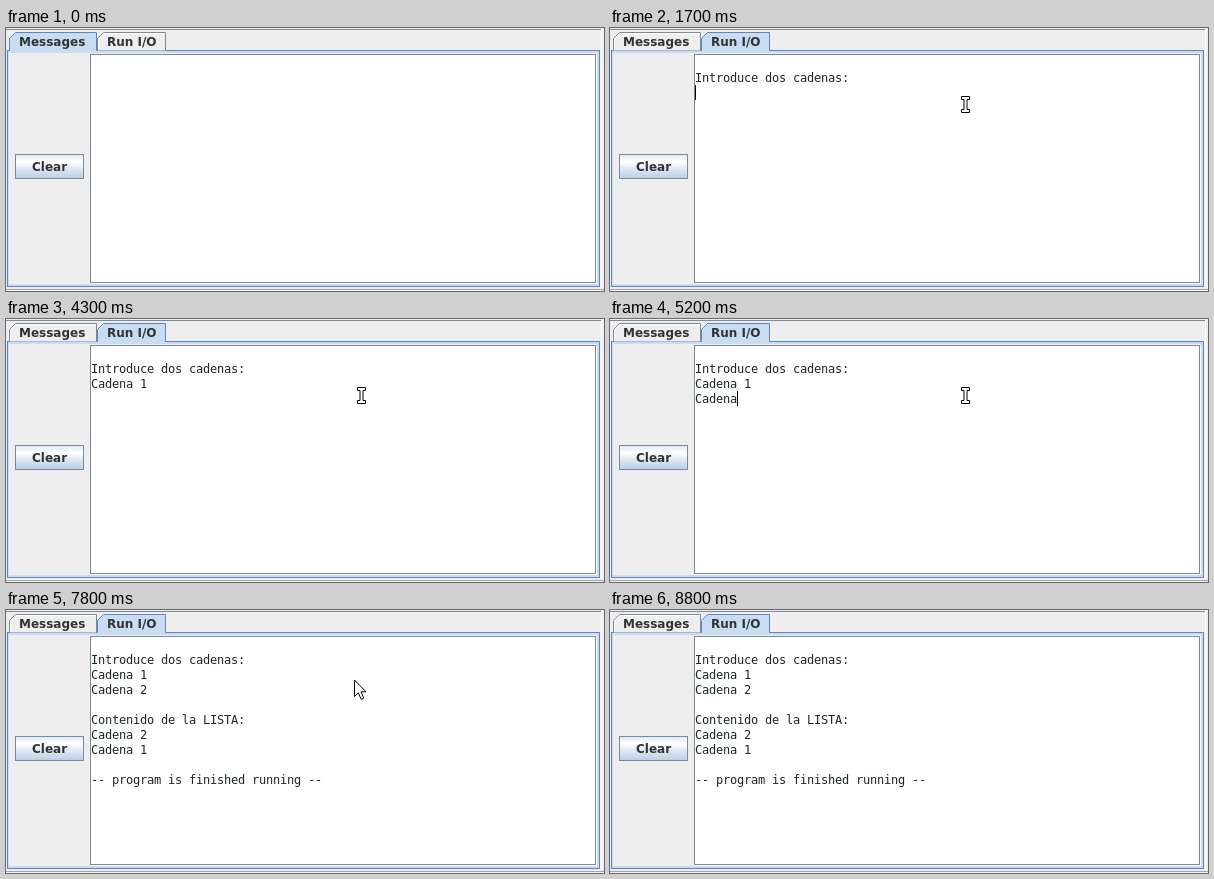
Recreate the animation shown at these times as an HTML page. Size 598 px wide and 263 px high, loop 8.9 s.

```html
<!DOCTYPE html>
<html lang="es">
<head>
<meta charset="utf-8">
<title>Run I/O</title>
<style>
html, body { margin: 0; width: 100%; height: 100%; overflow: hidden; background: #eee; }
svg { display: block; width: 598px; height: 263px; }
.ui { font: bold 12px "DejaVu Sans", sans-serif; fill: #333; }
.out { font: 12px "DejaVu Sans Mono", monospace; fill: #1c2626; white-space: pre; }
.tab { fill: #eee; stroke: #7a8a99; }
.tab.on { fill: #c8ddf2; stroke: #6382bf; }
.join { fill: #c8ddf2; visibility: hidden; }
.shine { fill: none; stroke: #fff; }
.on ~ .join { visibility: visible; }
.on ~ .shine { visibility: hidden; }
.pointer { fill: #fff; stroke: #000; }
</style>
</head>
<body>
<svg viewBox="0 0 598 263" xmlns="http://www.w3.org/2000/svg">
  <defs>
    <linearGradient id="metal" x2="0" y2="1">
      <stop offset="0" stop-color="#dde8f3"/>
      <stop offset=".3" stop-color="#fff"/>
      <stop offset=".6" stop-color="#dde8f3"/>
      <stop offset="1" stop-color="#b8cfe5"/>
    </linearGradient>
  </defs>

  <!-- window frame -->
  <rect width="598" height="263" fill="#eee"/>
  <path d="M0 1.5H595" stroke="#7a8a99"/>
  <path d="M595.5 1V260" stroke="#fff"/>
  <path d="M0 261.5H598" stroke="#a5a5a5"/>
  <path d="M0 262.5H598" stroke="#f4f4f4"/>

  <!-- tab pane -->
  <rect x="1.5" y="22.5" width="592" height="236" fill="#c8ddf2" stroke="#6382bf"/>
  <rect x="3" y="25" width="588" height="231" fill="#eee"/>
  <g>
    <path class="tab" d="M3.5 22.5V10.5L9.5 4.5H90.5V22.5"/>
    <path class="shine" d="M4.5 22V11L10 5.5H90"/>
    <rect class="join" x="4" y="22" width="86" height="1"/>
    <text class="ui" x="13" y="18">Messages</text>
  </g>
  <g>
    <path class="tab" d="M91.5 22.5V10.5L97.5 4.5H159.5V22.5"/>
    <path class="shine" d="M92.5 22V11L98 5.5H159"/>
    <rect class="join" x="92" y="22" width="67" height="1"/>
    <text class="ui" x="101" y="18">Run I/O</text>
  </g>

  <!-- button and text area -->
  <rect x="9.5" y="126.5" width="68" height="24" fill="url(#metal)" stroke="#7a8a99"/>
  <text class="ui" x="26" y="143">Clear</text>
  <path d="M590.5 27V255.5H85" fill="none" stroke="#fff"/>
  <rect x="84.5" y="26.5" width="505" height="228" fill="#fff" stroke="#7a8a99"/>
  <g id="lines"></g>
  <rect id="caret" width="1" height="15" fill="#000"/>

  <path id="beam" class="pointer" d="M.5 .5H8.5V3.5H6V13.5H8.5V16.5H.5V13.5H3V3.5H.5Z"/>
  <path id="arrow" class="pointer" stroke-linejoin="miter"
    d="M.5 1V17.5L4.3 13.8L7.2 20.3L9.8 19.2L7 12.8H12Z"/>
</svg>
<script>
const LOOP = 8900, LEFT = 85, TOP = 27, ROW = 15, COL = 7;
const $ = s => document.querySelector(s);
const ask = '\nIntroduce dos cadenas:\n';
const one = ask + 'Cadena 1\n';
const list = one + 'Cadena 2\n\nContenido de la LISTA:\nCadena 2\nCadena 1\n';
const done = list + '\n-- program is finished running --';

// time, text, caret shown
const typing = [
  [0, '', 0],
  [700, ask, 0],
  [900, ask, 1],
  [1200, ask, 0],
  [1700, ask, 1],
  [2200, ask + 'C', 1],
  [2700, ask + 'Cad', 1],
  [2800, ask + 'Cade', 1],
  [3000, ask + 'Cadena', 1],
  [3200, ask + 'Cadena ', 1],
  [3400, ask + 'Cadena 1', 1],
  [3800, one, 1],
  [4300, one, 0],
  [4700, one + 'Ca', 1],
  [4900, one + 'Cad', 1],
  [5000, one + 'Cade', 1],
  [5100, one + 'Caden', 1],
  [5200, one + 'Cadena', 1],
  [5300, one + 'Cadena ', 1],
  [5500, one + 'Cadena 2', 1],
  [6000, list, 1],
  [6400, done, 0]
];

// time, pointer shape, x, y
const moves = [
  [0, ''],
  [1300, 'beam', 351, 68],
  [6000, 'arrow', 353, 73],
  [7800, 'arrow', 348, 69],
  [7900, 'arrow', 338, 58],
  [8000, 'arrow', 322, 40],
  [8100, 'arrow', 305, 21],
  [8200, 'arrow', 289, 3],
  [8300, '']
];

const at = (steps, t) => steps.findLast(s => s[0] <= t);
const show = (el, on) => el.setAttribute('visibility', on ? 'visible' : 'hidden');

const tabs = document.querySelectorAll('.tab');
const caret = $('#caret');
const rows = Array.from({ length: 11 }, (_, i) => {
  const el = document.createElementNS('http://www.w3.org/2000/svg', 'text');
  el.setAttribute('class', 'out');
  el.setAttribute('x', LEFT);
  el.setAttribute('y', TOP + i * ROW + 12);
  $('#lines').append(el);
  return el;
});

// whole-pixel character advance
rows[0].textContent = 'n'.repeat(40);
$('#lines').style.letterSpacing = (COL - rows[0].getComputedTextLength() / 40).toFixed(4) + 'px';

let last;
function draw(now) {
  const t = now % LOOP;
  const step = at(typing, t);
  if (step !== last) {
    last = step;
    const [time, text, blink] = step;
    const lines = text.split('\n');
    rows.forEach((el, i) => el.textContent = lines[i] || '');
    tabs.forEach((el, i) => el.classList.toggle('on', i === +(time >= 700)));
    caret.setAttribute('x', LEFT + COL * lines.at(-1).length);
    caret.setAttribute('y', TOP + ROW * (lines.length - 1));
    show(caret, blink);
  }
  const [, shape, x, y] = at(moves, t);
  for (const id of ['beam', 'arrow']) {
    const el = $('#' + id);
    show(el, id === shape);
    if (id === shape) el.setAttribute('transform', `translate(${x} ${y})`);
  }
}

const start = performance.now();
function tick() {
  draw(performance.now() - start);
  requestAnimationFrame(tick);
}
tick();
</script>
</body>
</html>
```
